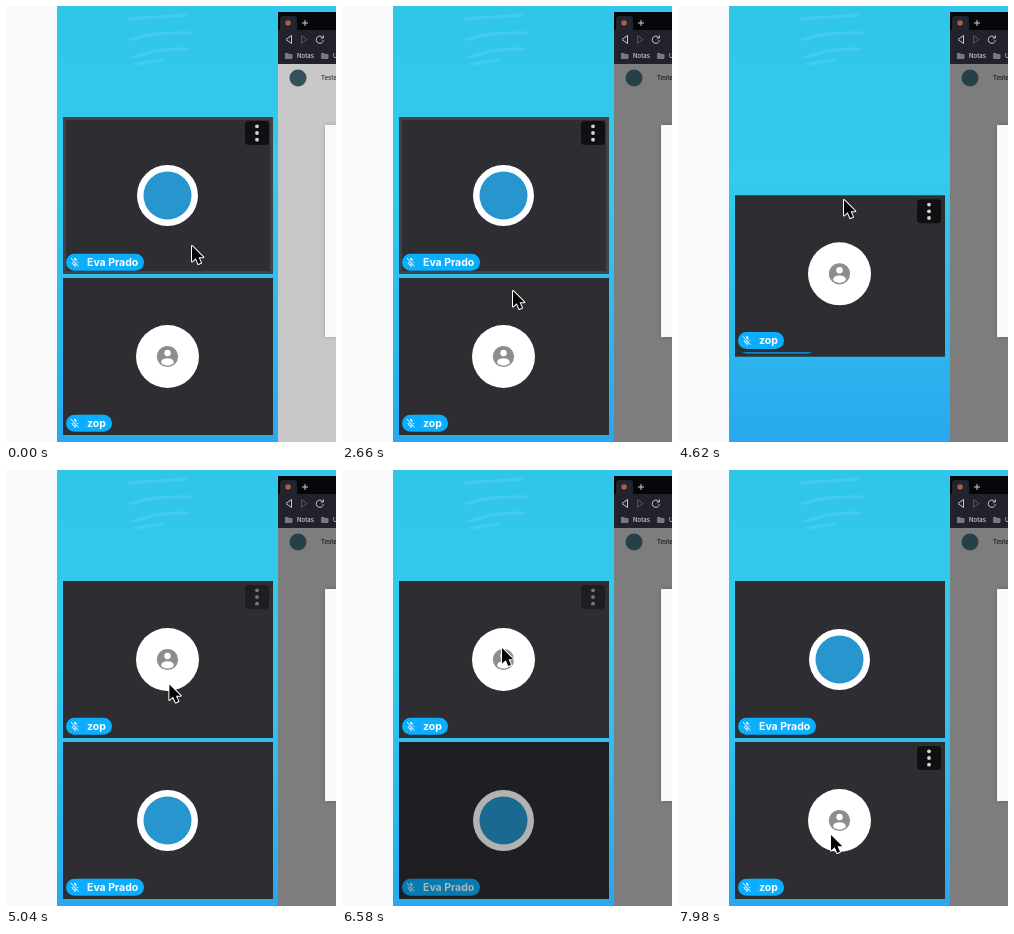
Write an HTML page with a canvas that moves like this. It is 330x436 px and loops after 8 s.

```html
<!DOCTYPE html>
<html lang="pt">
<head>
<meta charset="utf-8">
<title>Tile swap</title>
<style>
html, body { margin: 0; width: 100%; height: 100%; overflow: hidden; background: #f8f9fb; }
canvas { display: block; width: 330px; height: 436px; }
</style>
</head>
<body>
<canvas id="stage" width="330" height="436"></canvas>
<script>
const ctx = document.getElementById('stage').getContext('2d');
const LOOP = 8000, STEP = 70;
const TILE = { x: 57, w: 210, h: 157, top: 111, bottom: 272 };
const FONT = 'Inter, "Open Sans", sans-serif';

const clamp = v => Math.max(0, Math.min(1, v));
const ramp = (t, a, b) => clamp((t - a) / (b - a));
const ease = p => p * p * (3 - 2 * p);
const mix = (a, b, p) => a + (b - a) * p;
// Visible from a to b, with a short fade at each end.
const fade = (t, a, b, d = 140) => Math.min(ramp(t, a, a + d), 1 - ramp(t, b, b + d));

// time, x, y of the pointer tip
const path = [
  [0, 186, 240], [2590, 186, 240], [2660, 171, 285], [2940, 172, 322],
  [3220, 172, 322], [3570, 167, 195], [4620, 166, 194], [4970, 164, 200],
  [5320, 158, 340], [5600, 158, 340], [5810, 155, 206], [6160, 159, 192],
  [6580, 160, 178], [7210, 158, 190], [7630, 153, 365], [8000, 153, 365]
];

function pointer(t) {
  let i = 1;
  while (i < path.length - 1 && t > path[i][0]) i++;
  const [t0, x0, y0] = path[i - 1], [t1, x1, y1] = path[i];
  const p = ease(ramp(t, t0, t1));
  return { x: mix(x0, x1, p), y: mix(y0, y1, p) };
}

function rect(x, y, w, h, color) {
  ctx.fillStyle = color;
  ctx.fillRect(x, y, w, h);
}

function round(x, y, w, h, r, color) {
  ctx.fillStyle = color;
  ctx.beginPath();
  ctx.roundRect(x, y, w, h, r);
  ctx.fill();
}

function disc(x, y, r, color) {
  ctx.fillStyle = color;
  ctx.beginPath();
  ctx.arc(x, y, r, 0, Math.PI * 2);
  ctx.fill();
}

function text(str, x, y, font, color) {
  ctx.font = font + ' ' + FONT;
  ctx.fillStyle = color;
  ctx.fillText(str, x, y);
}

function line(d, color, width) {
  ctx.strokeStyle = color;
  ctx.lineWidth = width;
  ctx.stroke(new Path2D(d));
}

function frame(x, y, w, h, color, width) {
  ctx.strokeStyle = color;
  ctx.lineWidth = width;
  ctx.strokeRect(x + width / 2, y + width / 2, w - width, h - width);
}

function withAlpha(a, draw) {
  if (a <= 0) return;
  ctx.save();
  ctx.globalAlpha = a;
  draw();
  ctx.restore();
}

function drawBackground() {
  rect(0, 0, 51, 436, '#f8f9fb');
  const g = ctx.createLinearGradient(0, 0, 0, 436);
  g.addColorStop(0, '#30c6ea');
  g.addColorStop(0.4, '#33caec');
  g.addColorStop(0.7, '#2ebbee');
  g.addColorStop(1, '#28a8ee');
  rect(51, 0, 279, 436, g);
  line('M121 13L181 9M123 34Q150 25 186 27M126 52Q155 41 183 43M128 58L158 54',
    'rgba(255,255,255,.09)', 3);
}

function drawBrowser(t) {
  const dim = ramp(t, 770, 1190);
  rect(272, 6, 58, 18, '#06070b');
  round(274, 10, 17, 14, [3, 3, 0, 0], '#22232b');
  disc(282, 17, 2.8, '#a05f50');
  line('M296 17H302M299 14V20', '#d0d0d4', 1);
  rect(272, 24, 58, 34, '#21222b');
  line('M285.5 29.5L280 33.5L285.5 37.5Z', '#c9c9ce', 1);
  line('M295.5 29.5L301 33.5L295.5 37.5Z', '#565760', 1);
  line('M316.6 31.4A3.6 3.6 0 1 0 317.4 34.2M317.4 29.5V32H314.8', '#c9c9ce', 1);
  for (const x of [279, 315]) {
    round(x, 47, 3.5, 2, 0.5, '#777880');
    round(x, 48, 7.5, 5, 0.8, '#777880');
  }
  text('Notas', 291, 52, '500 6px', '#d4d4d8');
  text('U', 327, 52, '500 6px', '#d4d4d8');

  const v = Math.round(mix(200, 125, dim));
  rect(272, 58, 58, 378, `rgb(${v},${v},${v})`);
  disc(292, 72, 8.5, dim > 0.5 ? '#263f4b' : '#33505d');
  text('Teste', 315, 74, '500 6px', dim > 0.5 ? '#151515' : '#2a2a2a');
  ctx.save();
  ctx.shadowColor = 'rgba(0,0,0,.2)';
  ctx.shadowBlur = 4;
  rect(319, 119, 20, 212, '#f9f9fa');
  ctx.restore();
}

function drawMic(x, y) {
  round(x - 1.4, y - 4, 2.8, 5.5, 1.4, '#fff');
  line(`M${x - 3} ${y}Q${x - 2.6} ${y + 3} ${x} ${y + 3}Q${x + 2.6} ${y + 3} ${x + 3} ${y}M${x} ${y + 3}V${y + 5}`,
    '#fff', 0.9);
  line(`M${x - 3.2} ${y - 4.2}L${x + 4.2} ${y + 4.4}`, '#0aaeff', 1.8);
  line(`M${x - 4} ${y - 4}L${x + 3.5} ${y + 4.5}`, '#fff', 0.9);
}

function drawLabel(y, name, width) {
  round(60, y + 136.7, width, 17, 8.5, '#0aaeff');
  drawMic(69, y + 145);
  text(name, 81, y + 149, '700 10.5px', '#fff');
}

function logoAvatar(x, y) {
  disc(x, y, 30.5, '#fff');
  disc(x, y, 24, '#2796cf');
}

function userAvatar(x, y) {
  disc(x, y, 31.5, '#fff');
  disc(x, y, 10.6, '#8d8d90');
  disc(x, y - 3.5, 3.2, '#fff');
  ctx.beginPath();
  ctx.ellipse(x, y + 5.4, 6.3, 3.7, 0, 0, Math.PI * 2);
  ctx.fill();
}

function drawMenu(y) {
  round(239, y + 4, 24, 24, 4, '#101012');
  for (const dy of [9.3, 16, 22.7]) disc(251, y + dy, 1.9, '#d2d2d4');
}

function drawTile(tile, y) {
  const { x, w, h } = TILE;
  rect(x, y, w, h, '#2d2d32');
  withAlpha(tile.ring, () => frame(x, y, w, h, '#414247', 3));
  tile.avatar(161.5, y + 78.5);
  drawLabel(y, tile.name, tile.pill);
  withAlpha(tile.menu, () => drawMenu(y));
  withAlpha(tile.dim, () => rect(x, y, w, h, 'rgba(0,0,0,.3)'));
  withAlpha(tile.lit, () => {
    rect(x, y, w, h, 'rgba(255,255,255,.26)');
    frame(x, y, w, h, '#1d60e2', 3);
  });
}

function drawGhost(p) {
  const x = p.x - 90, y = p.y - 40;
  ctx.beginPath();
  ctx.roundRect(x + 1.5, y + 1.5, 149, 122, 2);
  ctx.fillStyle = 'rgba(170,170,170,.5)';
  ctx.fill();
  ctx.strokeStyle = '#2465e8';
  ctx.lineWidth = 3;
  ctx.stroke();
}

function drawArrow({ x, y }) {
  const arrow = new Path2D('M0 0V15.5L3.7 12.2L6.3 18L9 16.8L6.5 11.2H11.3Z');
  ctx.save();
  ctx.translate(x, y);
  ctx.lineJoin = 'round';
  ctx.strokeStyle = '#fff';
  ctx.lineWidth = 2;
  ctx.stroke(arrow);
  ctx.fillStyle = '#050505';
  ctx.fill(arrow);
  ctx.restore();
}

function drawHand({ x, y }) {
  const hand = new Path2D('M-4 7L-6.5 2.5Q-7.5 0 -5 .3L-5 -3Q-4.5 -6 -2.3 -4.4Q-1 -6.6 .8 -4.8Q2.6 -6.3 3.7 -4Q6.3 -4.5 6.2 -1.5Q6.2 2.5 4.3 4.5V7Z');
  ctx.save();
  ctx.translate(x, y);
  ctx.lineJoin = 'round';
  ctx.fillStyle = '#fff';
  ctx.fill(hand);
  ctx.strokeStyle = '#111';
  ctx.lineWidth = 1.2;
  ctx.stroke(hand);
  line('M-2.2 -3V.5M.8 -3V.5M3.6 -2.5V.5', '#111', 0.9);
  ctx.restore();
}

function draw(t) {
  const first = ease(ramp(t, 4340, 4890));
  const second = ease(ramp(t, 6760, 7310));
  const swap = first - second;
  const p = pointer(t);
  const a = {
    name: 'Eva Prado', pill: 78, avatar: logoAvatar,
    ring: 1 - ramp(t, 2660, 2800),
    menu: Math.max(1 - ramp(t, 2660, 2800), fade(t, 5180, 5600), fade(t, 7070, 7420)),
    dim: fade(t, 5810, 6580),
    lit: Math.max(fade(t, 3360, 4130), fade(t, 5600, 5810))
  };
  const b = {
    name: 'zop', pill: 46, avatar: userAvatar, ring: 0,
    menu: Math.max(fade(t, 2660, 3220), fade(t, 4200, 4970), fade(t, 6510, 6860), ramp(t, 7490, 7630)),
    dim: fade(t, 3220, 4130),
    lit: Math.max(fade(t, 3220, 3360), fade(t, 5880, 6370))
  };
  const ya = mix(TILE.top, TILE.bottom, swap);
  const yb = mix(TILE.bottom, TILE.top, swap);

  drawBackground();
  drawBrowser(t);
  const order = [[a, ya], [b, yb]];
  if (t > 6000) order.reverse();
  for (const [tile, y] of order) drawTile(tile, y);

  const drag = (t >= 3290 && t < 4130) || (t >= 5880 && t < 6440);
  const hand = (t >= 3220 && t < 4200) || (t >= 5530 && t < 6510);
  if (drag) drawGhost(p);
  if (hand) drawHand(p);
  else drawArrow(p);
}

const start = performance.now();
function tick() {
  const t = (performance.now() - start) % LOOP;
  draw(Math.floor(t / STEP) * STEP);
  requestAnimationFrame(tick);
}
tick();
</script>
</body>
</html>
```
